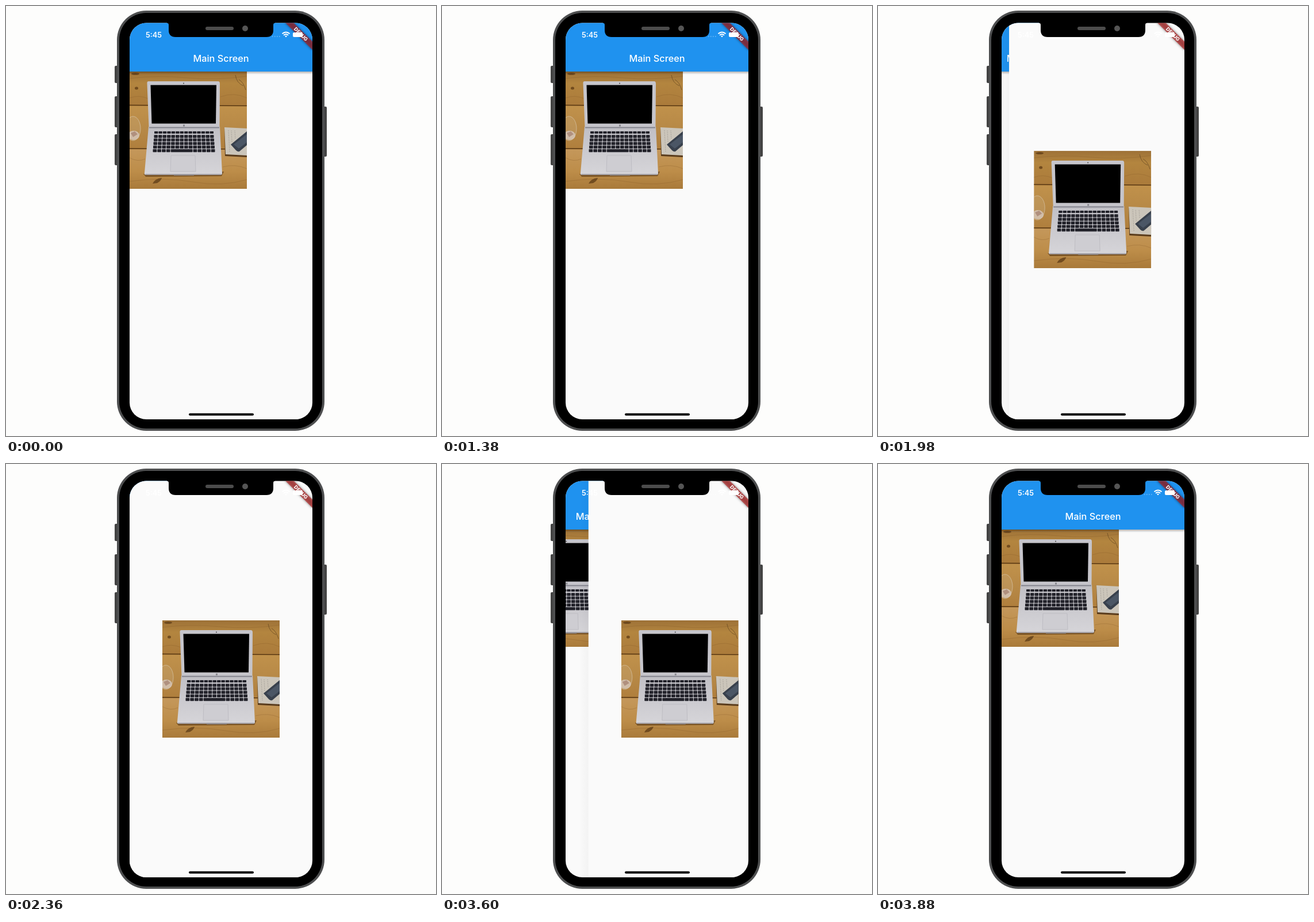
Write an HTML page that moves like this. It is 748 by 748 pixels and loops after 3.9 s.

```html
<!DOCTYPE html>
<html lang="en">
<head>
<meta charset="utf-8">
<title>Shared image transition</title>
<style>
  html, body { margin: 0; width: 100%; height: 100%; overflow: hidden; background: #fdfdfc; }
  svg { display: block; width: 748px; height: 748px; }
  text { font-family: Inter, Roboto, sans-serif; fill: #fff; }
</style>
</head>
<body>
<svg viewBox="0 0 748 748">
  <defs>
    <clipPath id="screen"><rect x="215" y="29.500" width="318" height="689.500" rx="29"/></clipPath>
    <clipPath id="square"><rect width="204" height="204"/></clipPath>
    <linearGradient id="wood" x2="0" y2="1">
      <stop offset="0" stop-color="#9d7137"/>
      <stop offset=".1" stop-color="#b3853f"/>
      <stop offset=".28" stop-color="#ab7b3b"/>
      <stop offset=".3" stop-color="#c0914b"/>
      <stop offset=".5" stop-color="#b68846"/>
      <stop offset=".65" stop-color="#b07f3d"/>
      <stop offset=".67" stop-color="#c4975a"/>
      <stop offset=".85" stop-color="#bd8d49"/>
      <stop offset="1" stop-color="#a97a3a"/>
    </linearGradient>
    <linearGradient id="metal" x2="0" y2="1">
      <stop offset="0" stop-color="#c0bfc5"/>
      <stop offset="1" stop-color="#d6d5d9"/>
    </linearGradient>
    <linearGradient id="barShade" x2="0" y2="1">
      <stop offset="0" stop-opacity=".28"/>
      <stop offset="1" stop-opacity="0"/>
    </linearGradient>
    <linearGradient id="edgeShade">
      <stop offset="0" stop-opacity="0"/>
      <stop offset="1" stop-opacity=".03"/>
    </linearGradient>
    <filter id="soft" x="-20%" y="-80%" width="140%" height="260%"><feGaussianBlur stdDeviation="2.2"/></filter>

    <g id="photo" clip-path="url(#square)">
      <rect width="204" height="204" fill="url(#wood)"/>
      <g fill="none" stroke="#7d5424" stroke-opacity=".28">
        <path d="M0 12Q50 6 100 11T204 8M0 46Q16 40 32 47M158 44Q182 35 204 46M0 150Q14 158 27 152M162 166Q184 160 204 169M0 191Q60 183 110 192T204 188"/>
        <path d="M184 6Q186 20 198 25M190 14Q198 18 202 32" stroke="#4f3518" stroke-opacity=".55"/>
      </g>
      <path d="M0 58.500L204 59.500M0 134L204 135" stroke="#54330f" stroke-width="1.500"/>
      <g fill="#573612" fill-opacity=".7">
        <ellipse cx="12" cy="29" rx="3" ry="2.500"/>
        <path d="M40 195Q44 186 56 185Q55 190 48 194Z"/>
        <ellipse cx="10" cy="4" rx="7" ry="2"/>
      </g>
      <path d="M24 178L28 183L160 182L164 174Z" fill="#50310f" fill-opacity=".6"/>
      <ellipse cx="6" cy="99" rx="13" ry="21" fill="#cdb493" fill-opacity=".22" stroke="#d8c5a8" stroke-opacity=".7"/>
      <ellipse cx="7" cy="111" rx="10" ry="8" fill="#d8ccc5" fill-opacity=".75"/>
      <path d="M2 107L9 104L14 109L6 114Z" fill="#8f6557" fill-opacity=".5"/>
      <path d="M165 99L204 101V149L166 147Z" fill="#5a3c1c"/>
      <path d="M165 97L204 99V146L167 144Z" fill="#cbc5ba"/>
      <path d="M172 102L174 140M177 103L178 122M183 103L184 117" stroke="#8d8983" stroke-dasharray="1 2"/>
      <path d="M176 127L204 104V128L191 139Q188 140 185 137Z" fill="#38404c"/>
      <path d="M181 127L204 109V123L190 134Z" fill="#4b5665"/>
      <path d="M33 17H154Q157 17 157 21L156.500 97H33.500L30.500 21Q30 17 33 17Z" fill="#c6c5cb"/>
      <path d="M36.500 23.500H151L150 90.500H38.500Z"/>
      <circle cx="94" cy="20.500" r="1" fill="#444"/>
      <rect x="93" y="92.500" width="3" height="3" fill="#85858b"/>
      <path d="M33 96H157L161 177Q161 180 158 180H29Q25 180 26 176Z" fill="url(#metal)"/>
      <path d="M34 97.500H156" stroke="#85858f" stroke-width="2"/>
      <path d="M27 179H160M77 180H112" stroke="#96949a" stroke-width="1.500"/>
      <path d="M72 146H114L115 174H71Z" fill="#cecdd2" stroke="#b9b8be" stroke-width=".8"/>
      <g id="keys" fill="#22222a"/>
    </g>
  </defs>

  <rect width="748" height="748" fill="#fdfdfc"/>
  <g fill="#434343">
    <rect x="189" y="104" width="8" height="30" rx="2"/>
    <rect x="189" y="157" width="8" height="54" rx="2"/>
    <rect x="189" y="223" width="8" height="54" rx="2"/>
    <rect x="550" y="175" width="8" height="87" rx="2"/>
  </g>
  <rect x="193" y="8" width="361" height="731" rx="51" fill="#4e4f50"/>
  <rect x="197" y="12" width="353" height="723" rx="47"/>

  <g clip-path="url(#screen)">
    <g id="main">
      <rect x="215" y="29" width="318" height="690" fill="#fafafa"/>
      <use id="mainPhoto" href="#photo" x="215" y="114"/>
      <rect x="215" y="114" width="318" height="5" fill="url(#barShade)"/>
      <rect x="215" y="29" width="318" height="85" fill="#1f92ef"/>
      <text x="374" y="97" font-size="16.3" font-weight="500" text-anchor="middle">Main Screen</text>
    </g>
    <g id="detail">
      <rect x="199" y="29" width="16" height="690" fill="url(#edgeShade)"/>
      <rect x="215" y="29" width="318" height="690" fill="#fafafa"/>
      <use id="detailPhoto" href="#photo" x="272" y="272"/>
    </g>
    <use id="flight" href="#photo"/>

    <g transform="translate(533 29) rotate(45)">
      <rect x="-34" y="23.200" width="68" height="10.200" fill-opacity=".5" filter="url(#soft)"/>
      <rect x="-34" y="23.200" width="68" height="10.200" fill="#b71c1c" fill-opacity=".63"/>
      <text y="31.300" font-size="8.600" font-weight="800" text-anchor="middle">DEBUG</text>
    </g>

    <text x="243" y="54.500" font-size="12.7" font-weight="600">5:45</text>
    <path d="M463 53h1.500m2.500 0h1.500m2.500 0h1.500m2.500 0h1.500" stroke="#fff" stroke-opacity=".4" stroke-width="1.500"/>
    <g fill="none" stroke="#fff" stroke-width="1.900">
      <path d="M480.500 48.300Q487 42.500 493.500 48.300M483 50.900Q487 47.200 491 50.900"/>
      <path d="M485 52.300Q487 50.800 489 52.300L487 54.500Z" fill="#fff" stroke="none"/>
    </g>
    <rect x="499" y="46" width="17" height="8" rx="2" fill="#fff"/>
    <rect x="318" y="708.500" width="113" height="4" rx="2"/>
  </g>

  <path d="M280 28V29.500Q283 29.500 283 33V42Q283 54 295 54H453Q465 54 465 42V33Q465 29.500 468 29.500V28Z"/>
  <rect x="347" y="36" width="49" height="6" rx="3" fill="#4c4c4c"/>
  <circle cx="416" cy="39" r="5" fill="#555"/>
</svg>

<script>
const LOOP = 3900, WIDTH = 318;
const PUSH = { start: 1798, length: 300 };
const DRAG = { start: 3500, end: 3700, reach: 156, settle: 300, done: 3880 };
const FROM = { x: 215, y: 114 }, TO = { x: 272, y: 272 };
const $ = id => document.getElementById(id);
const parts = ['main', 'detail', 'mainPhoto', 'detailPhoto', 'flight'];
const [main, detail, mainPhoto, detailPhoto, flight] = parts.map($);

function bezier(x1, y1, x2, y2) {
  const at = (a, b, s) => 3 * (1 - s) ** 2 * s * a + 3 * (1 - s) * s * s * b + s ** 3;
  return t => {
    if (t <= 0 || t >= 1) return t <= 0 ? 0 : 1;
    let lo = 0, hi = 1;
    for (let i = 0; i < 24; i++) {
      const mid = (lo + hi) / 2;
      if (at(x1, x2, mid) < t) lo = mid; else hi = mid;
    }
    return at(y1, y2, lo);
  };
}
const slide = bezier(.35, .91, .33, .97);
const fly = bezier(.4, 0, .2, 1);
const settle = bezier(.18, 1, .04, 1);

// Circular path that arrives vertically at TO
const dx = TO.x - FROM.x, dy = TO.y - FROM.y, chord = Math.hypot(dx, dy);
const radius = chord * chord / dx / 2;
const sweep = 2 * Math.asin(chord / (2 * radius));
function arc(k) {
  const angle = sweep * (1 - k);
  return [TO.x - radius * (1 - Math.cos(angle)), TO.y - radius * Math.sin(angle)];
}

// Left edge of the detail page, relative to the screen
function pageOffset(t) {
  if (t < PUSH.start || t >= DRAG.done) return WIDTH;
  if (t < DRAG.start) return WIDTH * (1 - slide((t - PUSH.start) / PUSH.length));
  if (t < DRAG.end) return DRAG.reach * ((t - DRAG.start) / (DRAG.end - DRAG.start)) ** 2;
  return DRAG.reach + (WIDTH - DRAG.reach) * settle((t - DRAG.end) / DRAG.settle);
}

const show = (el, on) => el.setAttribute('visibility', on ? 'visible' : 'hidden');
const move = (el, x, y = 0) => el.setAttribute('transform', `translate(${x} ${y})`);

function draw(t) {
  const offset = pageOffset(t), k = (t - PUSH.start) / PUSH.length;
  const flying = k >= 0 && k < 1;
  move(main, (offset - WIDTH) / 3);
  move(detail, offset);
  show(detail, offset < WIDTH);
  show(mainPhoto, !flying);
  show(detailPhoto, !flying && offset < WIDTH);
  show(flight, flying);
  if (flying) move(flight, ...arc(fly(k)));
}

function addKey(x, y, width, height) {
  const key = document.createElementNS('http://www.w3.org/2000/svg', 'rect');
  Object.entries({ x, y, width, height, rx: .8 }).forEach(([n, v]) => key.setAttribute(n, v));
  $('keys').append(key);
}
for (let row = 0; row < 6; row++) {
  const left = 43 - row * .5, step = (104 + row) / 14, y = 104 + row * 6.2;
  for (let i = 0; i < 14; i++) {
    const space = row === 5 && i > 3 && i < 9;
    if (space && i > 4) continue;
    addKey(left + i * step, y, space ? step * 5 - 1 : step - 1, row ? 5.2 : 4);
  }
}

const began = performance.now();
function tick() {
  draw((performance.now() - began) % LOOP);
  requestAnimationFrame(tick);
}
tick();
</script>
</body>
</html>
```
